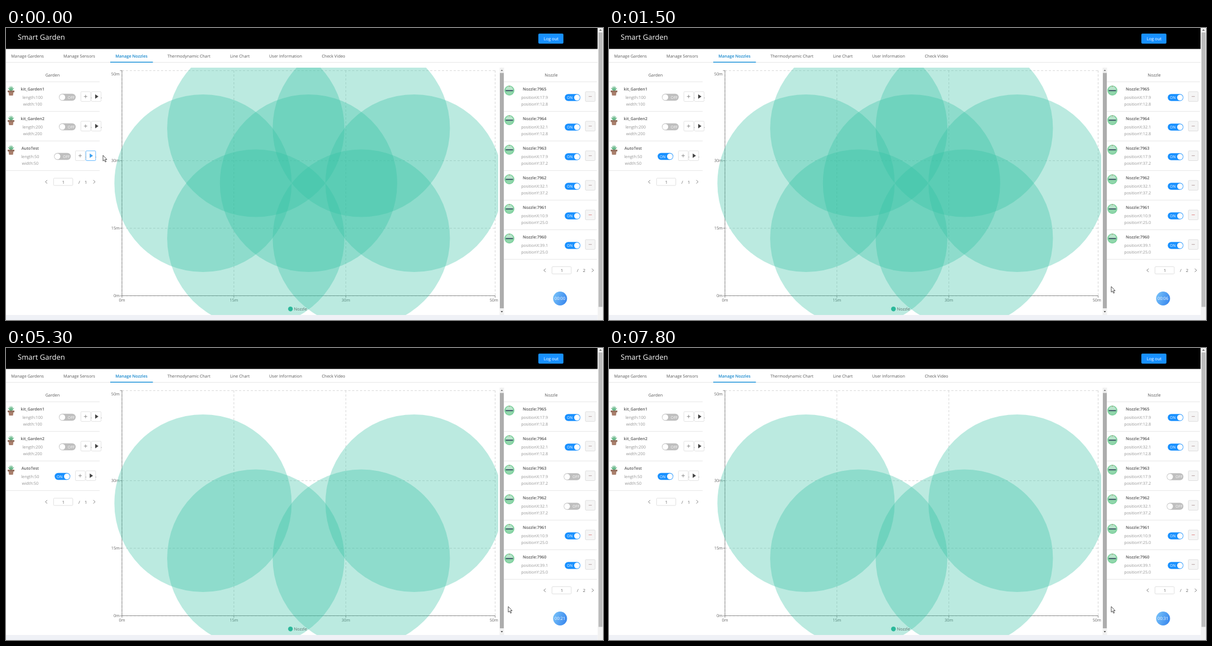
An HTML page that plays this animation: 1071x523 px, repeating every 8 s.

```html
<!DOCTYPE html>
<html lang="en">
<head>
<meta charset="utf-8">
<title>Smart Garden</title>
<style>
  html, body { margin: 0; width: 100%; height: 100%; overflow: hidden; background: #fff; }
  svg { display: block; width: 100%; height: 100%; }
  text { font-family: "Open Sans", "Noto Sans", sans-serif; text-rendering: geometricPrecision; }
</style>
</head>
<body>
<svg id="stage" viewBox="0 0 1071 523">
  <defs>
    <linearGradient id="blue" x1="0" y1="0.3" x2="1" y2="0.7">
      <stop offset="0" stop-color="#74bff8"/><stop offset="1" stop-color="#3987ee"/>
    </linearGradient>
    <clipPath id="chart"><rect x="186" y="71" width="697" height="443"/></clipPath>
    <g id="plant">
      <path d="M9 17Q5 15 3.500 11Q7.500 12 8.500 15Q5.500 10 6 8.500Q8 10 8.700 13Q8 9 9 7Q10.200 9 9.500 13Q10 10 12 8.500Q12.500 11 9.700 15Q11 12 14.500 11Q13 15 9.500 17Z" fill="#62b585"/>
      <path d="M4.500 18.500H13.500L12.500 25H5.500Z" fill="#a97f6c"/>
      <rect x="3" y="16" width="12" height="3" fill="#94705f"/>
    </g>
    <g id="nozzle">
      <circle r="9" fill="#82d2a1"/>
      <path d="M-6.500 -1A6.500 6.500 0 0 1 6.500 -1Z" fill="#b9e4cb"/>
      <path d="M-5.500 3H5.500M-4 5.500H4" stroke="#a5dcb9"/>
      <rect x="-6.500" y="-1" width="13" height="2.200" fill="#4a6470"/>
      <circle cy="-7.500" r=".8" fill="#c07a66"/>
    </g>
  </defs>
  <g id="scene"></g>
</svg>
<script>
const LOOP = 8000, STEP = 100, R = 159, GREY = '#595959', PALE = '#949494', BLUE = '#1890ff';
const px = x => 208 + 13.39 * x, py = y => 479.75 - 8.07 * y;
const between = (t, a, b) => t >= a && t < b;

// x and y in metres, off: the span of time when switched off
const nozzles = [
  { id: 7965, x: 17.93, y: 12.8 },
  { id: 7964, x: 32.07, y: 12.8, off: [1800, 5100] },
  { id: 7963, x: 17.93, y: 37.2, off: [1800, LOOP] },
  { id: 7962, x: 32.07, y: 37.2, off: [1800, LOOP] },
  { id: 7961, x: 10.86, y: 25, label: '10.860000000000001' },
  { id: 7960, x: 39.14, y: 25 },
  { x: 25, y: 25, off: [1800, LOOP] }
];
const gardens = [['kit_Garden1', 100], ['kit_Garden2', 200], ['AutoTest', 50]];
const tabs = [['Manage Gardens', 38.5], ['Manage Sensors', 131.5], ['Manage Nozzles', 225],
  ['Thermodynamic Chart', 328], ['Line Chart', 419.5], ['User Information', 501.5], ['Check Video', 587.5]];
const path = [[100, 174, 228], [700, 331, 302], [1100, 901, 463]];

// y is the middle of the capitals
const text = (s, x, y, fill = GREY, { size = 7.4, weight = 400, anchor = 'middle' } = {}) =>
  `<text x="${x}" y="${y + size * 0.36}" fill="${fill}" font-size="${size}" font-weight="${weight}" text-anchor="${anchor}">${s}</text>`;
const rect = (x, y, w, h, fill, extra = '') =>
  `<rect x="${x}" y="${y}" width="${w}" height="${h}" fill="${fill}" ${extra}/>`;
const circle = (x, y, r, fill, extra = '') =>
  `<circle cx="${x}" cy="${y}" r="${r}" fill="${fill}" ${extra}/>`;
const line = (d, stroke, extra = '') => `<path d="${d}" fill="none" stroke="${stroke}" ${extra}/>`;
const shape = (d, fill, extra = '') => `<path d="${d}" fill="${fill}" ${extra}/>`;
const box = (x, y, fill = '#fff', stroke = '#dcdcdc', w = 17.5, h = 17.5) =>
  rect(x, y, w, h, fill, `rx="1.5" stroke="${stroke}" stroke-width=".8"`);

function toggle(x, y, on) {
  const w = on ? 28 : 30;
  return rect(x - w / 2, y - 6.2, w, 12.4, on ? BLUE : '#bfbfbf', 'rx="6.2"') +
    circle(on ? x + 8 : x - 9, y, 5.2, '#fff') +
    text(on ? 'ON' : 'OFF', on ? x - 5 : x + 7, y + 0.3, '#fff', { size: 6.8 });
}

function pager(x, y, pages) {
  const arrow = (cx, s) => line(`M${cx + 1.7 * s} ${y - 3}l${-3.4 * s} 3l${3.4 * s} 3`, '#777', 'stroke-width=".9"');
  return arrow(x, 1) + box(x + 13, y - 6.5, '#fff', '#d9d9d9', 34.5, 13) +
    text(1, x + 30.5, y + 0.7) + text('/', x + 59, y + 0.7) + text(pages, x + 70.7, y + 0.7) + arrow(x + 86, -1);
}

function header() {
  return rect(0, 0, 1061.5, 37.5, '#000') +
    text('Smart Garden', 21, 16.5, '#fff', { size: 13, anchor: 'start' }) +
    rect(955, 10, 45, 18, BLUE, 'rx="2"') + text('Log out', 978, 19, '#fff', { size: 7.6 }) +
    line('M0 61.5H1061.5', '#e6e6e6') + rect(187, 60.5, 76.5, 1.5, '#1890d8') +
    tabs.map(([s, x], i) => i === 2
      ? text(s, x, 50.5, '#1486cc', { weight: 600 }) : text(s, x, 50.5)).join('');
}

function scrollbars() {
  return rect(0, 514, 1061.5, 9, '#eff1f6') +
    rect(1061.5, 0, 9.5, 523, '#f1f1f1') + rect(1063, 8, 7, 491.5, '#bcbcbc') +
    shape('M1064 5l2.500 -3l2.500 3Z', '#777') +
    rect(885.5, 71, 8, 443, '#f1f1f1') + rect(886, 80.5, 7, 421.5, '#adadad') +
    shape('M887.500 77l2 -2.500l2 2.500Z', '#777') + shape('M887.500 507l2 2.500l2 -2.500Z', '#444');
}

function gardenList(t) {
  const rows = gardens.map(([name, size], i) => {
    const y = 96 + 53 * i, last = i === 2, x = last ? 43.3 : 47.7, bx = last ? 124.5 : 134.3;
    const focus = last && t < 100;
    const dot = cx => rect(cx, y + 28.5, 1, 1.5, '#aaa');
    return `<use href="#plant" y="${y}"/>` +
      text(name, x, y + 13.5, GREY, { weight: 600, size: 7.3 }) +
      text('length:' + size, x, y + 28, PALE) + text('width:' + size, x, y + 40, PALE) +
      toggle(last ? 101.3 : 110, y + 28, last && t >= 100) +
      box(bx, y + 18) + line(`M${bx + 5.5} ${y + 26.7}h6m-3 -3v6`, '#777', 'stroke-width=".8"') +
      box(bx + 18.8, y + 18, '#fff', focus ? '#40a9ff' : '#dcdcdc') +
      shape(`M${bx + 25.7} ${y + 22.7}l5.800 4l-5.800 4Z`, focus ? '#3a9ff0' : '#444') +
      dot(bx + 18.3) + dot(bx + 36.2) + line(`M0 ${y + 53.3}H168`, '#e6e6e6');
  });
  return text('Garden', 83.5, 84) + line('M0 96.300H168', '#e6e6e6') + rows.join('') + pager(72.3, 275.5, 1);
}

const isOn = (n, t) => !(n.off && between(t, ...n.off));

function nozzleList(t) {
  const rows = nozzles.filter(n => n.id).map((n, i) => {
    const y = 96 + 53 * i, on = isOn(n, t);
    return `<use href="#nozzle" x="903" y="${y + 16}"/>` +
      text('Nozzle:' + n.id, 948.3, y + 13.5, GREY, { weight: 600 }) +
      text('positionX:' + n.x.toFixed(1), 948.2, y + 28, PALE, { size: 7.3 }) +
      text('positionY:' + n.y.toFixed(1), 948.2, y + 40, PALE, { size: 7.3 }) +
      toggle(on ? 1016.4 : 1015.5, y + 28.5, on) +
      box(1039.4, y + 18, '#f5f5f5', '#d9d9d9') +
      line(`M1045.300 ${y + 26.7}h5.600`, i === 4 ? '#e08585' : '#b5a0a0') +
      line(`M893 ${y + 53.3}H1060`, '#e6e6e6');
  });
  return text('Nozzle', 978, 84, GREY, { size: 7.6 }) + line('M893 96.300H1060', '#e6e6e6') +
    rows.join('') + pager(966.5, 434, 2);
}

function timer(t) {
  const pad = n => String(n).padStart(2, '0'), s = Math.floor(t * 4 / 1000 + 1e-6);
  return circle(994, 484.5, 12.5, 'url(#blue)') + text('00:' + pad(s), 993.8, 484.7, '#fff', { size: 7.6 });
}

function chart(t) {
  const marks = [0, 15, 30, 50];
  const grid = marks.map(v => `M208 ${py(v)}H877.500M${px(v)} 76V479.500`).join('');
  const ticks = marks.map(v => `M204.500 ${py(v)}h3.500M${px(v)} 479.500v3.500`).join('');
  const labels = marks.map(v =>
    text(v + 'm', 204, v === 50 ? 82.5 : py(v), '#666', { anchor: 'end' }) +
    text(v + 'm', v === 50 ? 875.3 : px(v), 487, '#666')).join('');
  const discs = nozzles.filter(n => isOn(n, t)).map(n =>
    circle(px(n.x), py(n.y), R, 'rgb(50,192,160)', 'fill-opacity=".33"')).join('');
  return `<g clip-path="url(#chart)">` +
    line(grid, '#ccc', 'stroke-width=".8" stroke-dasharray="4 3"') +
    line('M208 76V479.500H877.500' + ticks, '#777', 'stroke-width=".8"') + labels + discs +
    '</g>' + circle(510.3, 503.3, 4.2, '#2ab89a') + text('Nozzle', 528.3, 503, '#57716b', { size: 7.6 });
}

function cursorAt(t) {
  let p = path[0];
  for (const q of path) {
    if (t < q[0]) {
      const k = Math.max(0, (t - p[0]) / (q[0] - p[0]));
      return [1, 2].map(i => p[i] + (q[i] - p[i]) * k);
    }
    p = q;
  }
  return p.slice(1);
}

function tooltip(t, [mx, my]) {
  if (mx > 883) return '';
  const n = nozzles.filter(n => isOn(n, t) && Math.hypot(px(n.x) - mx, py(n.y) - my) < R).pop();
  if (!n) return '';
  const x = px(n.x), y = py(n.y), w = n.label ? 131.5 : 80, mid = x + 6 + w / 2;
  const rows = [`positionX : ${n.label || n.x}m`, `positionY : ${n.y}m`, 'Radius : 10'];
  return line(`M${x} 76V479.500M208 ${y}H877.500`, '#55aacb', 'stroke-width=".9"') +
    rect(x + 5.7, y + 5.9, w + 0.6, 60.6, '#fff', 'stroke="#ccc" stroke-width=".8"') +
    rows.map((s, i) => text(s, mid, y + 20.5 + 16.2 * i, '#000')).join('');
}

const pointer = ([x, y]) => shape('M0 0V10.200L2.300 8.100L4 12L5.700 11.300L4 7.500H7Z', '#fff',
  `transform="translate(${x} ${y})" stroke="#222" stroke-width=".8"`);

const scene = document.getElementById('scene');
let shown = -1;
function frame(now) {
  const tick = Math.floor(now % LOOP / STEP);
  if (tick !== shown) {
    shown = tick;
    const t = tick * STEP, at = cursorAt(t);
    scene.innerHTML = header() + scrollbars() + gardenList(t) + nozzleList(t) + timer(t) +
      chart(t) + tooltip(t, at) + pointer(at);
  }
  requestAnimationFrame(frame);
}
frame(0);
</script>
</body>
</html>
```
